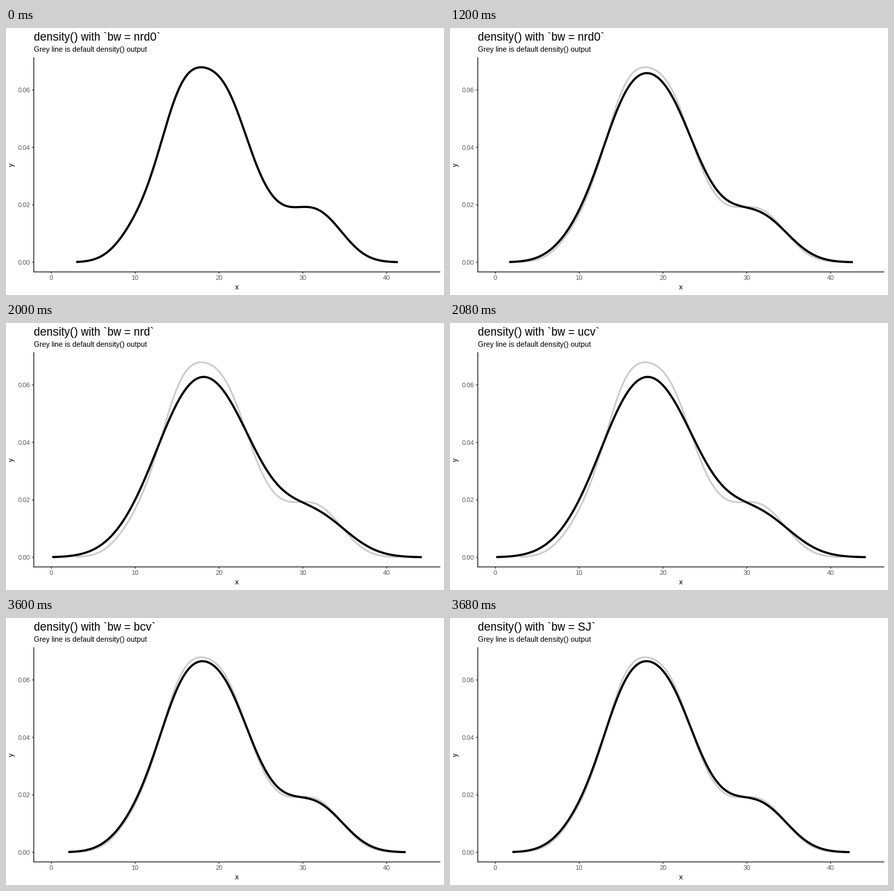
Recreate the animation shown at these times as a matplotlib script. Size 864 by 528 pixels, loop 4800 ms.

```python
import numpy as np
import matplotlib.pyplot as plt
from matplotlib.animation import FuncAnimation

plt.rcParams.update({
    "font.family": "Liberation Sans",
    "text.hinting": "native",
    "text.hinting_factor": 1,  # whole-pixel glyph advances
    "text.kerning_factor": 6,
    "path.snap": False,
})

W, H = 864, 528
LEFT, RIGHT, TOP, BOTTOM = 54.8, 856.67, 57.9, 482.4
X0, X_UNIT = 89.4, 16.537
Y0, Y_UNIT = 463.35, 5681
TICK = 3.67

FRAME_MS = 80
FRAMES = 60
FIRST, STEP = 15, 10  # frames until the first change, then between changes

DATA = np.array([
    21, 21, 22.8, 21.4, 18.7, 18.1, 14.3, 24.4, 22.8, 19.2, 17.8,
    16.4, 17.3, 15.2, 10.4, 10.4, 14.7, 32.4, 30.4, 33.9, 21.5,
    15.5, 15.2, 13.3, 19.2, 27.3, 26, 30.4, 15.8, 19.7, 15, 21.4])
BANDWIDTHS = [("nrd0", 2.477), ("nrd", 2.917), ("ucv", 3.43),
              ("bcv", 3.415), ("SJ", 2.79)]


def px(x):
    return X0 + X_UNIT * x


def py(y):
    return Y0 - Y_UNIT * y


def density(bw):
    """Gaussian kernel density in stage pixels, cut at three bandwidths."""
    x = np.linspace(DATA.min() - 3 * bw, DATA.max() + 3 * bw, 512)
    z = (x[:, None] - DATA) / bw
    y = np.exp(-z**2 / 2).mean(axis=1) / (bw * np.sqrt(2 * np.pi))
    return px(x), py(y)


fig = plt.figure(figsize=(W / 72, H / 72), dpi=72, facecolor="white")
ax = fig.add_axes([0, 0, 1, 1])
ax.set(xlim=(0, W), ylim=(H, 0))
ax.axis("off")


def line(xs, ys, color, width):
    return ax.plot(xs, ys, color=color, lw=width, solid_capstyle="butt",
                   solid_joinstyle="round")[0]


def label(x, y, text, size, color="black", **kw):
    return ax.text(x, y, text, fontsize=size, color=color, **kw)


curves = [density(bw) for _, bw in BANDWIDTHS]
line(*curves[0], "#cccccc", 3.41)
curve = line(*curves[0], "black", 4.27)

for v in range(0, 50, 10):
    line([px(v)] * 2, [BOTTOM, BOTTOM + TICK], "#333333", 1.42)
    label(px(v), 498, str(v), 11.73, "#4d4d4d", ha="center")
for v in (0, 0.02, 0.04, 0.06):
    line([LEFT - TICK, LEFT], [py(v)] * 2, "#333333", 1.42)
    label(48, py(v) + 4.4, f"{v:.2f}", 11.73, "#4d4d4d", ha="right")
line([LEFT, LEFT], [TOP, BOTTOM + 0.7], "black", 1.42)
line([LEFT - 0.7, RIGHT], [BOTTOM, BOTTOM], "black", 1.42)

title = label(55, 25, "", 23.47)
label(55, 47, "Grey line is default density() output", 14.67)
label((LEFT + RIGHT) / 2, 517, "x", 14.67, ha="center")
label(18, (TOP + BOTTOM) / 2, "y", 14.67, rotation=90, ha="right", va="center")


def stage(i):
    return min(max((i - FIRST) // STEP + 1, 0), len(BANDWIDTHS) - 1)


def update(i):
    curve.set_data(*curves[stage(i)])
    # the title follows one frame behind the curve
    name = BANDWIDTHS[stage(i - 1)][0]
    title.set_text(f"density() with `bw = {name}`")
    return curve, title


anim = FuncAnimation(fig, update, frames=FRAMES, interval=FRAME_MS,
                     repeat=True, repeat_delay=0)
plt.show()
```
